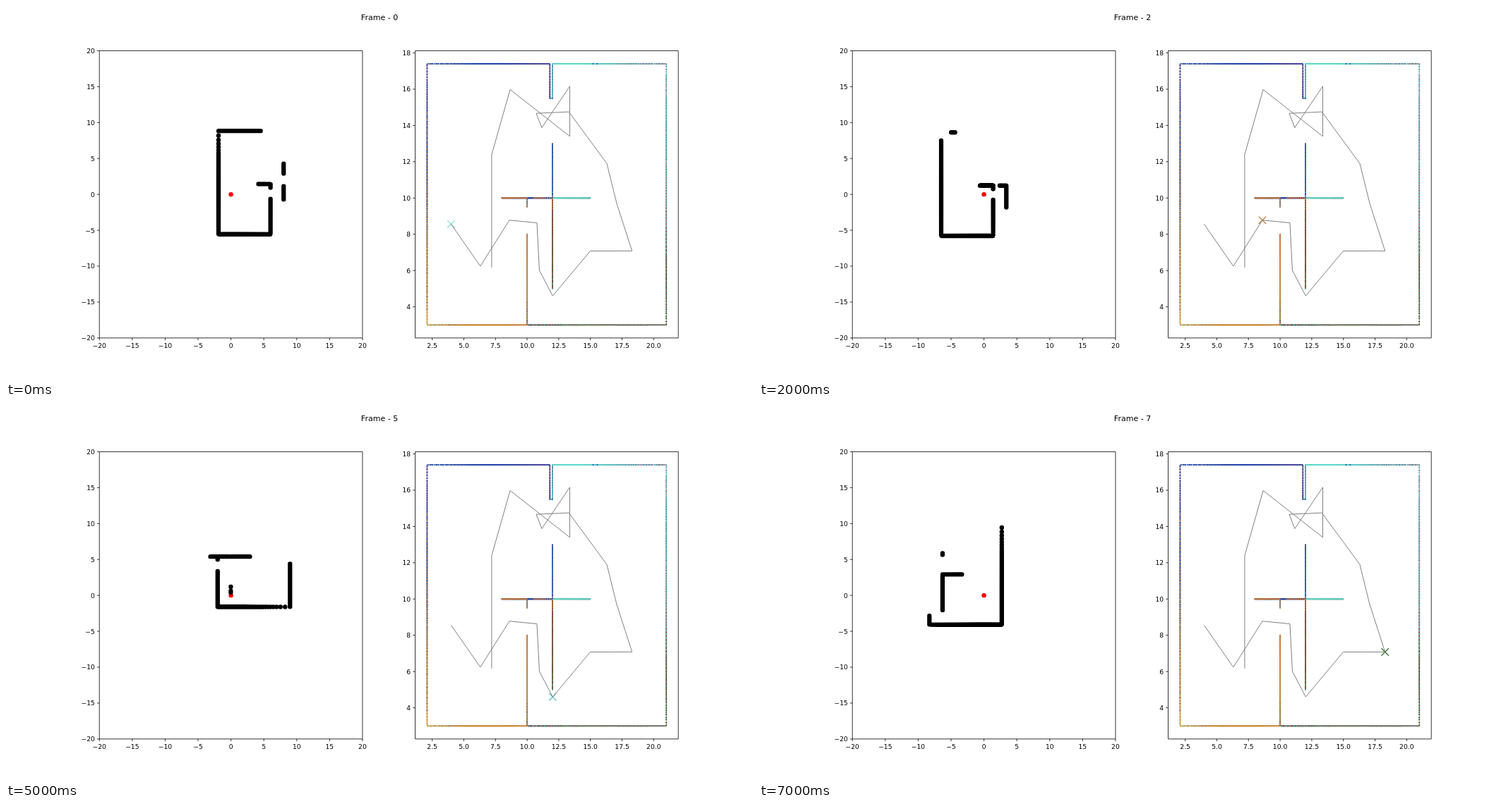
Recreate the animation shown at these times as an HTML page. Size 1058x529 px, loop 8 s.

```html
<!DOCTYPE html>
<html lang="en">
<head>
<meta charset="utf-8">
<title>Range scan</title>
<style>
html, body { margin: 0; width: 100%; height: 100%; overflow: hidden; background: #fff; }
svg { display: block; width: 100vw; height: 100vh; }
text { font-family: "DejaVu Sans", Verdana, sans-serif; font-size: 9.18px; fill: #000; }
#title { font-size: 11.02px; text-anchor: middle; }
path { fill: none; }
</style>
</head>
<body>
<svg id="stage" viewBox="0 0 1058 529"></svg>
<script>
const STEP = 1000, COUNT = 8, RANGE = 10;
const TOP = 63.48, BOTTOM = 470.81, WIDTH = 372.7;
const svg = document.getElementById('stage');

// Walls as x1, y1, x2, y2
const walls = [
  [2.1, 3, 2.1, 17.4], [21, 3, 21, 17.4], [2.1, 3, 21, 3], [2.1, 17.4, 21, 17.4],
  [11.8, 15.5, 11.8, 17.4], [12, 15.5, 12, 17.4], [11.8, 15.5, 12, 15.5],
  [12, 5, 12, 13], [8, 10, 15, 10], [10, 3, 10, 8], [10, 9.5, 10, 10]
];

// Stops of the sensor: x, y, colour
const stops = [
  [3.99, 8.56, '#86ddd3'], [6.306, 6.24, '#c3d02f'], [8.6, 8.776, '#b5793c'],
  [10.775, 8.63, '#3a76b5'], [10.97, 6.007, '#a8384f'], [12.021, 4.6, '#45b5bd'],
  [14.99, 7.076, '#6b9c33'], [18.29, 7.08, '#155a1c'], [17.08, 9.7, '#a83a55'],
  [16.3, 11.9, '#6f8f8c'], [13.3, 14.75, '#d886a5'], [10.72, 14.67, '#7d6a8c'],
  [11.16, 13.88, '#4b67b8'], [13.37, 16.16, '#4a8fb0'], [13.37, 13.4, '#5ddcc8'],
  [8.66, 15.98, '#a04a78'], [7.2, 12.39, '#0c3fae'], [7.2, 6.17, '#dc7f2c']
];

function add(parent, tag, attrs, text) {
  const el = document.createElementNS('http://www.w3.org/2000/svg', tag);
  for (const k in attrs) el.setAttribute(k, attrs[k]);
  if (text !== undefined) el.textContent = text;
  parent.appendChild(el);
  return el;
}

function plot(left, x0, x1, y0, y1) {
  return {
    left,
    x: v => left + (v - x0) / (x1 - x0) * WIDTH,
    y: v => BOTTOM - (v - y0) / (y1 - y0) * (BOTTOM - TOP)
  };
}

// Distance along a ray to one wall, or Infinity
function hit([px, py], c, s, [x1, y1, x2, y2]) {
  const upright = x1 === x2;
  const d = upright ? (x1 - px) / c : (y1 - py) / s;
  if (!(d > 0)) return Infinity;
  const at = upright ? py + d * s : px + d * c;
  const [lo, hi] = upright ? [y1, y2] : [x1, x2];
  return at >= lo - 1e-9 && at <= hi + 1e-9 ? d : Infinity;
}

// One ray per degree, offsets from the sensor
function scan(stop) {
  const out = [];
  for (let deg = 0; deg < 360; deg++) {
    const a = deg * Math.PI / 180, c = Math.cos(a), s = Math.sin(a);
    const d = Math.min(...walls.map(w => hit(stop, c, s, w)));
    if (d <= RANGE) out.push([d * c, d * s]);
  }
  return out;
}

function dots(parent, p, points, size, color) {
  const d = points.map(([x, y]) => `M${p.x(x).toFixed(2)} ${p.y(y).toFixed(2)}h0.001`).join('');
  return add(parent, 'path', { d, stroke: color, 'stroke-width': size, 'stroke-linecap': 'round' });
}

function axes(p, xs, ys, digits) {
  const label = (v, n) => v.toFixed(n).replace('-', '\u2212');
  let d = `M${p.left} ${TOP}h${WIDTH}V${BOTTOM}h${-WIDTH}Z`;
  for (const v of xs) {
    d += `M${p.x(v)} ${BOTTOM}v3.2`;
    add(svg, 'text', { x: p.x(v), y: 484.6, 'text-anchor': 'middle' }, label(v, digits));
  }
  for (const v of ys) {
    d += `M${p.left} ${p.y(v)}h-3.2`;
    add(svg, 'text', { x: p.left - 6.4, y: p.y(v) + 3.5, 'text-anchor': 'end' }, label(v, 0));
  }
  add(svg, 'path', { d, stroke: '#000', 'stroke-width': 0.8 });
}

const steps = (from, to, by) =>
  Array.from({ length: Math.round((to - from) / by) + 1 }, (_, i) => from + i * by);

const local = plot(132.25, -20, 20, -20, 20);
const map = plot(579.5, 2.1 - 0.945, 21 + 0.945, 3 - 0.72, 17.4 + 0.72);
const scans = stops.map(scan);

// Map: later scans cover earlier ones
stops.forEach(([x, y, color], i) =>
  dots(svg, map, scans[i].map(([dx, dy]) => [x + dx, y + dy]), 1.85, color));

// Sensor dot, then one group for each step
dots(svg, local, [[0, 0]], 6.4, '#f00');
const views = stops.slice(0, COUNT).map(([x, y, color], i) => {
  const g = add(svg, 'g', { visibility: 'hidden' });
  dots(g, local, scans[i], 6.4, '#000');
  const r = 5.2, cx = map.x(x), cy = map.y(y);
  add(g, 'path', {
    d: `M${cx - r} ${cy - r}l${2 * r} ${2 * r}m0 ${-2 * r}l${-2 * r} ${2 * r}`,
    stroke: color, 'stroke-width': 1.2
  });
  return g;
});

add(svg, 'path', {
  d: 'M' + stops.map(([x, y]) => `${map.x(x)} ${map.y(y)}`).join('L'),
  stroke: '#808080', 'stroke-width': 1, 'stroke-linejoin': 'round'
});

axes(local, steps(-20, 20, 5), steps(-20, 20, 5), 0);
axes(map, steps(2.5, 20, 2.5), steps(4, 18, 2), 1);
const title = add(svg, 'text', { id: 'title', x: 529, y: 19.7 }, '');

let shown = -1;
const start = performance.now();
function tick() {
  const i = Math.floor((performance.now() - start) / STEP) % COUNT;
  if (i !== shown) {
    views.forEach((g, k) => g.setAttribute('visibility', k === i ? 'visible' : 'hidden'));
    title.textContent = 'Frame - ' + i;
    shown = i;
  }
  requestAnimationFrame(tick);
}
tick();
</script>
</body>
</html>
```
